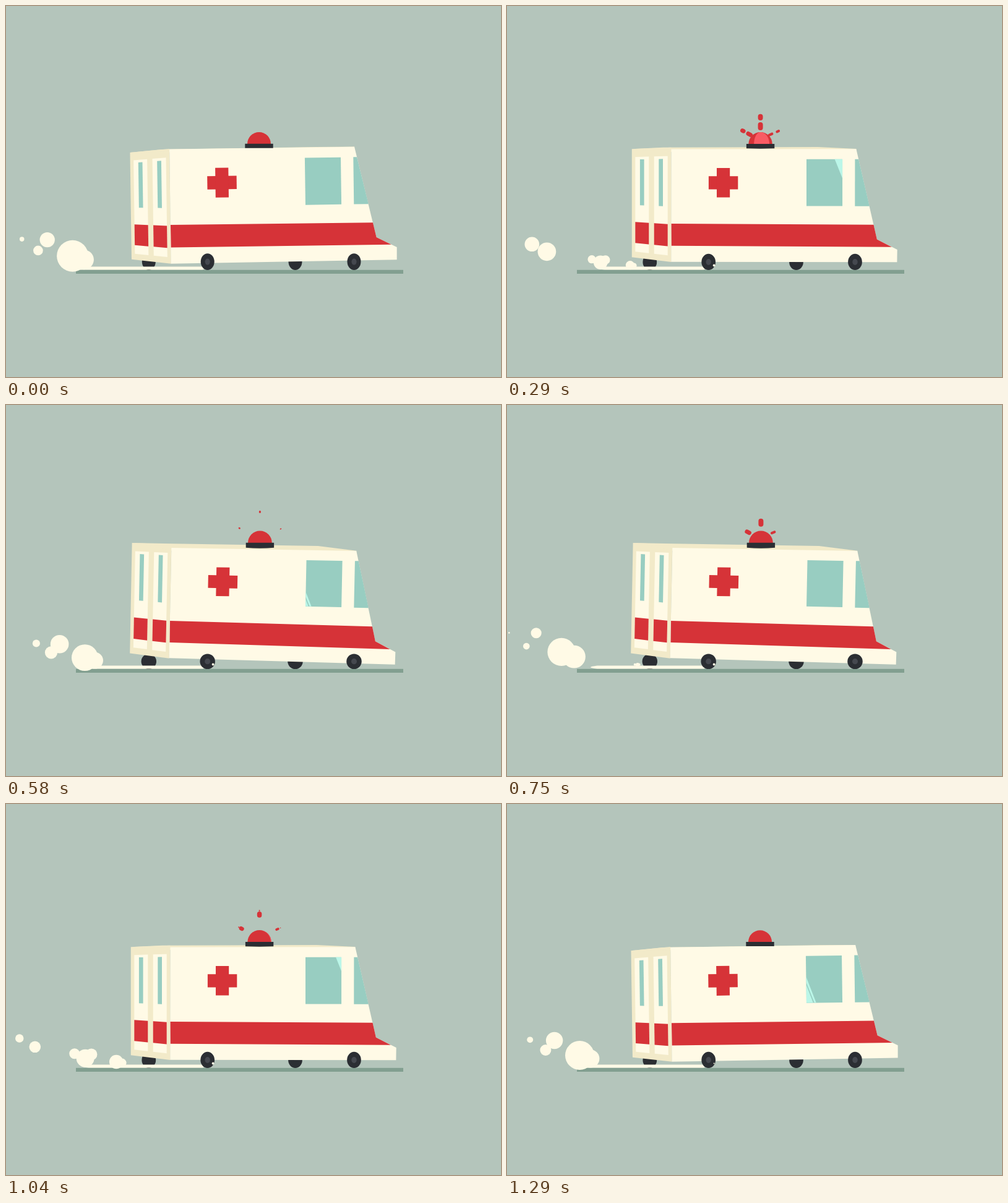
Write an HTML page with a canvas that moves like this. It is 800x600 px and loops after 1.33 s.

```html
<!DOCTYPE html>
<html lang="en">
<head>
<meta charset="utf-8">
<title>Ambulance</title>
<style>
html, body { margin: 0; width: 100%; height: 100%; overflow: hidden; background: #b4c5bb; }
canvas { display: block; }
</style>
</head>
<body>
<canvas id="stage" width="800" height="600"></canvas>
<script>
const ctx = document.getElementById('stage').getContext('2d');
const LOOP = 1330, FRAMES = 32, SMOKE_CYCLE = 16;
const COLOR = {
  sky: '#b4c5bb', road: '#829f90', cream: '#fffae6', trim: '#f2eac9', red: '#d63338',
  flash: '#f95b64', glass: '#98cdc1', glare: '#bbf6e8', dark: '#2b2e33', hub: '#45484f'
};
const mix = (a, b, k) => a + (b - a) * k;
const clamp = (v, low, high) => Math.max(low, Math.min(high, v));
const wave = turns => (1 - Math.cos(2 * Math.PI * turns)) / 2;

function ellipse(x, y, rx, ry, color) {
  ctx.fillStyle = color;
  ctx.beginPath();
  ctx.ellipse(x, y, rx, ry, 0, 0, Math.PI * 2);
  ctx.fill();
}

function trace(points) {
  ctx.beginPath();
  for (const [x, y] of points) ctx.lineTo(x, y);
  ctx.closePath();
}

function poly(color, points) {
  trace(points);
  ctx.fillStyle = color;
  ctx.fill();
}

const box = (x, y, w, h) => [[x, y], [x + w, y], [x + w, y + h], [x, y + h]];

// Smoke: every puff leaves the rear wheel, slows, rises, swells and fades.
const PUFFS = [
  { born: 0, speed: 14.9, rise: 54, size: 9.5, peak: 10, life: 19 },
  { born: 0, speed: 12.6, rise: 40, size: 14.5, peak: 9, life: 22 },
  { born: 0, speed: 11.3, rise: 78, size: 14.8, peak: 14, life: 22 },
  { born: 3.5, speed: 10.7, rise: 50, size: 25.5, peak: 12.5, life: 24 },
  { born: 3.5, speed: 8.8, rise: 42, size: 21, peak: 16.5, life: 24.5 }
];

function drawPuff({ born, speed, rise, size, peak, life }, time) {
  const age = time - born;
  if (age <= 0 || age >= life) return;
  const drag = (speed - 8.8) * 0.018;
  const travel = speed * age - drag * age * age;
  const y = 421 - rise * (travel / 236) ** 1.8;
  const fade = Math.max(0, (age - peak) / (life - peak));
  const r = size * Math.min(1, age / peak) * (1 - fade ** 1.25);
  ellipse(236 - travel, y, r, r, COLOR.cream);
}

function drawSmoke(phase) {
  const left = Math.min(106 + 14 * phase, Math.max(114, 230 - 12 * phase));
  ctx.fillStyle = COLOR.cream;
  ctx.beginPath();
  ctx.moveTo(325, 421.5);
  ctx.lineTo(318, 426.6);
  ctx.lineTo(left + 12, 426.6);
  ctx.quadraticCurveTo(left - 10, 424, left + 12, 421.5);
  ctx.fill();
  for (const puff of PUFFS) {
    drawPuff(puff, phase);
    drawPuff(puff, phase + SMOKE_CYCLE);
  }
}

function drawWheel(x, squash, hub) {
  const rx = 11 + 2.5 * squash, ry = 13.4 - 2.2 * squash, y = 427 - ry;
  ellipse(x, y, rx, ry, COLOR.dark);
  if (hub) ellipse(x, y, rx * 0.37, ry * 0.38, COLOR.hub);
}

// Vertical travel of each panel's corners: top left, top right, bottom left, bottom right.
const REAR = { x: 202, w: 63, lift: [-14, -5.5, -8, -7] };
const SIDE = { x: 265, w: 367, lift: [-0.5, 10, -7.5, 9.5] };
const ROOF = { x: 265, w: 367, lift: [-7.5, 4, -7.5, 4] };

function drawBody(tilt, dy, n) {
  const pitch = tilt - 0.42;
  const warp = ({ x: px, w, lift: [tl, tr, bl, br] }) => ([x, y]) => {
    const u = (x - px) / w, v = (y - 231) / 183;
    const lift = mix(mix(tl, tr, u), mix(bl, br, u), v);
    return [x + pitch * (325 - y) * 0.034, y + pitch * lift + dy];
  };
  const side = warp(SIDE), roof = warp(ROOF), warpRear = warp(REAR);
  // The rear face recedes, so its lines fan out to the right.
  const rear = ([x, y]) =>
    warpRear([x, y + (x - REAR.x) * mix(-0.04, 0.12, (y - 231) / 175)]);

  const onRear = (color, ...rect) => poly(color, box(...rect).map(rear));
  const onSide = (color, points) => poly(color, points.map(side));

  onRear(COLOR.trim, 201.8, 231.2, 63.6, 175);
  poly(COLOR.trim, [rear([201.8, 231.2]), roof([252.7, 228.7]), roof([502.5, 228]),
    side([564.4, 231]), side([564.4, 236]), side([265.5, 236])]);
  for (const x of [207.3, 237.7]) {
    onRear(COLOR.cream, x, 244.2, 22, 152.4);
    onRear(COLOR.red, x, 348.8, 22, 33.8);
    onRear(COLOR.glass, x + 7.6, 248.3, 6.7, 73.2);
  }

  const bonnet = [597.9, 377.4];
  onSide(COLOR.cream, [[265.5, 231.3], [564.4, 231.2], bonnet, [630.7, 394],
    [630.4, 414.2], [265.3, 413.6]]);
  onSide(COLOR.red, [[265.6, 351.9], [592.5, 353.6], bonnet, [621.8, 389.6], [265.8, 387.7]]);
  onSide(COLOR.glass, [[562.4, 247.6], [568.2, 247.6], [585.8, 323.6], [562.3, 323.6]]);
  onSide(COLOR.red, box(325.9, 275.1, 47.4, 21.2));
  onSide(COLOR.red, box(339, 262, 21.2, 47.4));

  const pane = box(484, 247.7, 58.1, 75.7).map(side);
  poly(COLOR.glass, pane);
  drawGlare(pane, n);
}

function drawGlare(pane, n) {
  const [left, bottom] = pane[3];
  const sweep = n < 17.4 ? n : n - 17.4;
  const end = left - 6 + 106 * wave(Math.min(1, sweep / 16));
  ctx.save();
  trace(pane);
  ctx.clip();
  for (const [from, to] of [[-20, -4.8], [-2.9, 0]]) {
    poly(COLOR.glare, [[end + from, bottom], [end + to, bottom],
      [end + to - 31, bottom - 80], [end + from - 32, bottom - 80]]);
  }
  ctx.restore();
}

function drawRay(x, y, width, length, angle) {
  ctx.save();
  ctx.translate(x, y);
  ctx.rotate(angle);
  ctx.fillStyle = COLOR.red;
  ctx.beginPath();
  ctx.roundRect(-length, -width, length * 2, width * 2, width);
  ctx.fill();
  ctx.restore();
}

function drawRays(x, y, n) {
  for (const launch of [1.8, 5.3, 15.5, 19.5]) {
    const left = 1 - (n - launch) / 10;
    if (left <= 0 || left >= 1) continue;
    const near = left * left;
    const width = Math.min(4, 0.6 + 7 * left), length = Math.min(6.5, 0.8 + 9 * left);
    drawRay(x, y - 50.7 + 32 * near, width, length, -Math.PI / 2);
    drawRay(x - 33.5 + 22.7 * near, y - 24 + 12 * near, width * 0.85, length * 0.85, 0.49);
    drawRay(x + 34 - 25.3 * near, y - 22.8 + 10.7 * near, width * 0.52, length * 0.68, -0.4);
  }
}

function drawBeam(x, y, r, time) {
  const edge = delay => clamp(-1 + (time - delay) * 0.65, -1, 1);
  const lead = edge(0), trail = edge(2);
  if (lead <= trail) return;
  // The lit part lies between two meridians of the dome.
  const meridian = at => Array.from({ length: 13 }, (_, i) => {
    const a = i / 12 * Math.PI / 2;
    return [x + r * at * Math.cos(a), y - r * Math.sin(a)];
  });
  poly(COLOR.flash, [...meridian(lead), ...meridian(trail).reverse()]);
}

function drawSiren(tilt, dy, n) {
  const x = 409 + 1.4 * tilt, y = 223 + dy, r = 19 + 0.4 * tilt;
  drawRays(x, y, n);
  ctx.fillStyle = COLOR.red;
  ctx.beginPath();
  ctx.arc(x, y, r, Math.PI, 0);
  ctx.fill();
  for (const start of [4.3, 20]) drawBeam(x, y, r, n - start);

  const base = y + 6.7 + tilt;
  ctx.fillStyle = COLOR.dark;
  ctx.beginPath();
  ctx.moveTo(x - 22.7, y - 0.2);
  ctx.lineTo(x + 22.7, y - 0.2);
  ctx.lineTo(x + 22.7, base);
  ctx.quadraticCurveTo(x, base + 2 * tilt, x - 22.7, base);
  ctx.fill();
}

function drawPebble(phase) {
  const r = phase < 2 ? 0 : 1.9 * Math.min(1, (SMOKE_CYCLE - phase) / 2);
  ellipse(334.6, 419.5, r, r, COLOR.cream);
}

function draw(n) {
  const phase = n % SMOKE_CYCLE;
  const tilt = 1.04 * wave(n / FRAMES);
  const squash = wave(n / 8);
  const dy = 1.3 * squash * (1 - tilt);

  ctx.fillStyle = COLOR.sky;
  ctx.fillRect(0, 0, 800, 600);
  ctx.fillStyle = COLOR.road;
  ctx.fillRect(113, 426.8, 529, 6.2);
  for (const x of [230.8, 467.5]) drawWheel(x, squash, false);
  drawSmoke(phase);
  drawBody(tilt, dy, n);
  for (const x of [325.7, 562.5]) drawWheel(x, squash, true);
  drawPebble(phase);
  drawSiren(tilt, dy, n);
}

const start = performance.now();
function tick() {
  const t = (performance.now() - start) % LOOP;
  // Stepped at 24 pictures a second.
  draw(Math.floor(t / LOOP * FRAMES + 0.15) % FRAMES);
  requestAnimationFrame(tick);
}
tick();
</script>
</body>
</html>
```
